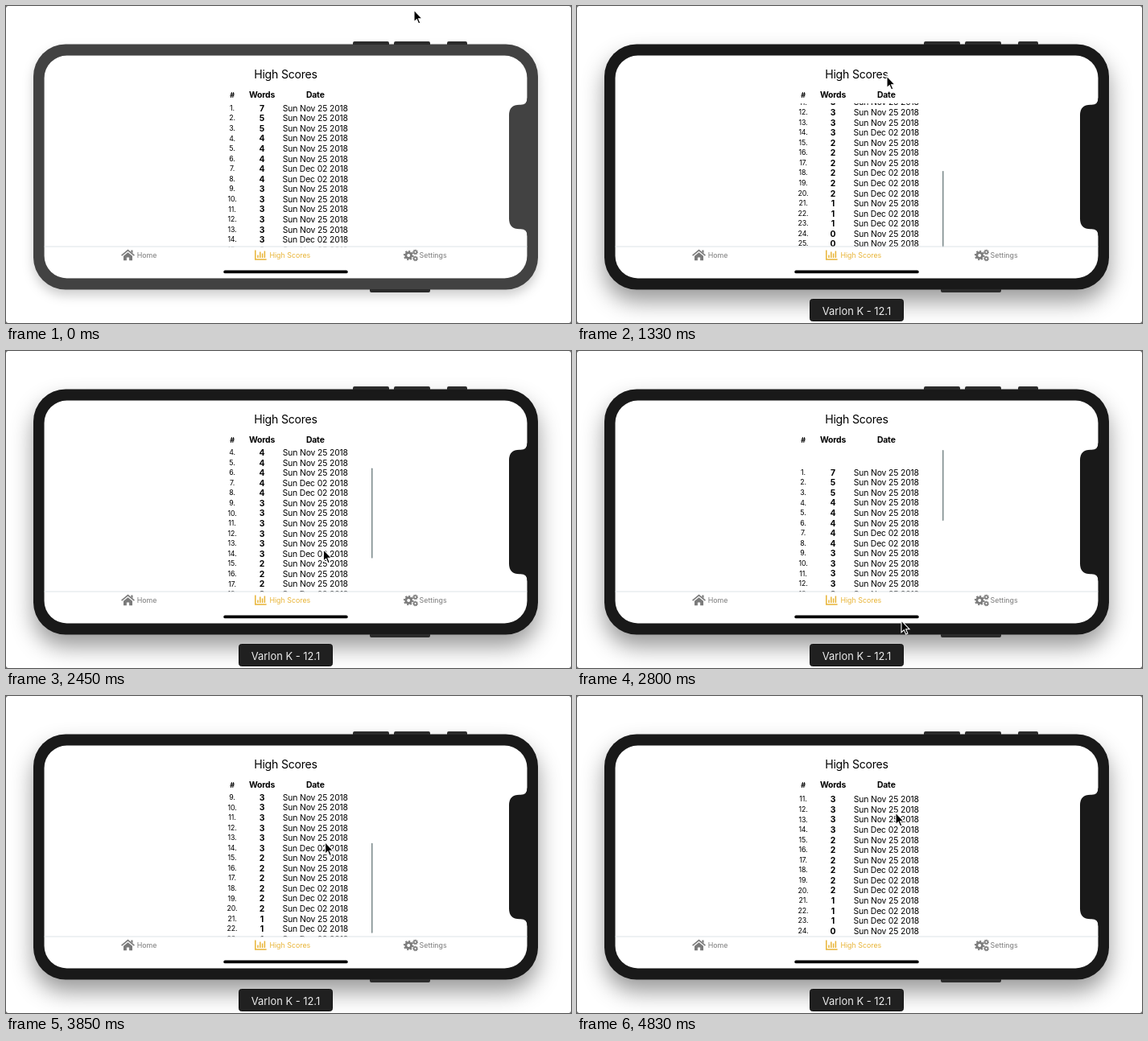
Animation of 702x394 px, one loop 5040 ms. Source, as an HTML page:

```html
<!DOCTYPE html>
<html lang="en">
<head>
<meta charset="utf-8">
<title>High Scores</title>
<style>
  html, body { margin: 0; width: 100%; height: 100%; overflow: hidden; background: #fff; }
  svg { display: block; width: 702px; height: 394px; font-family: Inter, sans-serif; text-anchor: middle; }
  .cell { font-size: 10.4px; letter-spacing: -.15px; }
  .bold { font-weight: 700; }
  .index { font-size: 8.8px; letter-spacing: -.1px; }
  .tab { font-size: 8.85px; text-anchor: start; stroke: none; }
  #shell { --case: #424242; --shadow: drop-shadow(0 7px 7px rgba(0,0,0,.2)); }
  #shell.active { --case: #191919; --shadow: drop-shadow(0 15px 14px rgba(0,0,0,.4)); }
  #case { fill: var(--case); filter: var(--shadow); }
  #notch { fill: var(--case); }
</style>
</head>
<body>
<svg viewBox="0 0 702 394">
  <defs>
    <clipPath id="listClip"><rect x="250" y="121" width="220" height="178.3"/></clipPath>
    <g id="gear" fill="none">
      <circle r="3.4" stroke-width="2.8"/>
      <circle r="5.3" stroke-width="2" pathLength="16" stroke-dasharray="1 1"/>
    </g>
  </defs>
  <path d="M0 0H2L0 2ZM702 0V2L700 0ZM0 394V392L2 394ZM702 394H700L702 392Z" fill="#777"/>

  <g id="shell">
    <rect id="case" x="34" y="47.5" width="627" height="305" rx="40"/>
    <path d="M431 48V46Q431 44 433 44H474Q476 44 476 46V48ZM482 48V46Q482 44 484 44H525Q527 44 527 46V48ZM548 48V46Q548 44 550 44H571Q573 44 573 46V48ZM452 352V354Q452 356 454 356H525Q527 356 527 354V352Z" fill="#2b2b2b"/>
    <rect x="47.5" y="61.5" width="600" height="277" rx="28"/>
    <rect x="47.5" y="61.5" width="600" height="277" rx="28" fill="#fff"/>
    <path id="notch" d="M649 114.5H647.5Q647.5 122.7 639.5 122.7H638Q625 122.7 625 135.7V264.3Q625 277.3 638 277.3H639.5Q647.5 277.3 647.5 285.5H649Z"/>
  </g>

  <text x="347.5" y="90.4" font-size="14.1" letter-spacing="-.22">High Scores</text>
  <g class="cell bold">
    <text x="281" y="113.5" class="index">#</text>
    <text x="318" y="114.4">Words</text>
    <text x="384.3" y="114.4">Date</text>
  </g>

  <g clip-path="url(#listClip)">
    <g id="rows"></g>
    <rect id="indicator" x="454" width="1.5" rx=".7" fill="#7b898a"/>
  </g>

  <rect x="47.5" y="298.5" width="600" height="1" fill="#d9e0e4" fill-opacity=".85"/>
  <g fill="#7b7b7b" stroke="#7b7b7b">
    <path d="M143.6 310.2L151.5 303.6L159.4 310.2" fill="none" stroke-width="1.6"/>
    <path d="M146 310.8L151.5 306.2L157 310.8V316.3H153.1V312.4H149.9V316.3H146ZM155.3 303.6H157.5V307.4L155.3 305.5Z" stroke="none"/>
    <text class="tab" x="162.7" y="313.2">Home</text>
    <use href="#gear" x="500.2" y="310"/>
    <use href="#gear" transform="translate(508.6 305.8) scale(.54)"/>
    <use href="#gear" transform="translate(508.6 313.9) scale(.54)"/>
    <text class="tab" x="513.6" y="313.2">Settings</text>
  </g>
  <g fill="#e8b437" stroke="#e8b437">
    <path d="M309.8 303.6V315H323.6M313 313V309.4M315.8 313V305.6M318.6 313V307.6M321.4 313V304.4" fill="none" stroke-width="1.5"/>
    <text class="tab" x="327.4" y="313.2">High Scores</text>
  </g>
  <rect x="270.3" y="328.6" width="154.4" height="3.7" rx="1.85"/>

  <g id="label">
    <rect x="289.5" y="364.5" width="116" height="27" rx="3" fill="#202020" stroke="#141414"/>
    <text x="347.5" y="383.6" font-size="12.9" fill="#ececec">Varlon K - 12.1</text>
  </g>
  <path id="cursor" d="M0 0V14.6L3.3 11.6L5.6 17L7.9 16L5.6 10.7H10Z" stroke="#fff" stroke-width="1.1"/>
</svg>
<script>
const LOOP = 5040, STEP = 70;
const ROW_HEIGHT = 12.56, MAX_SCROLL = 124, VIEWPORT = 189;
const SPRING = 0.013;
const $ = id => document.getElementById(id);

// Pointer stops: time, x, y
const stops = [
  [0, 507, 5], [560, 393, 228], [840, 392, 228], [1280, 385, 87], [1534, 385, 87],
  [2117, 386, 161], [2790, 403, 335], [2870, 403, 336], [3260, 398, 283],
  [3360, 398, 283], [4100, 396, 145], [LOOP, 396, 145]
];
// Drags: press time, release time, scroll offset at press, resting offset
const drags = [
  [840, 1330, 0, MAX_SCROLL],
  [2117, 2870, MAX_SCROLL, 0],
  [3360, 4200, 0, MAX_SCROLL]
];

const clamp = (v, lo, hi) => Math.min(hi, Math.max(lo, v));

function pointer(t) {
  const i = stops.findIndex(s => s[0] > t);
  const [t0, x0, y0] = stops[i - 1], [t1, x1, y1] = stops[i];
  const u = (t - t0) / (t1 - t0), e = u * u * (3 - 2 * u);
  return { x: x0 + (x1 - x0) * e, y: y0 + (y1 - y0) * e };
}

function rubberBand(offset) {
  const edge = clamp(offset, 0, MAX_SCROLL), over = offset - edge;
  const pull = (1 - 1 / (Math.abs(over) * 0.55 / VIEWPORT + 1)) * VIEWPORT;
  return edge + Math.sign(over) * pull;
}

function scrollAt(t) {
  const drag = drags.filter(d => d[0] <= t).pop();
  if (!drag) return 0;
  const [press, release, from, rest] = drag;
  const offset = rubberBand(from + pointer(press).y - pointer(Math.min(t, release)).y);
  const k = SPRING * Math.max(0, t - release);
  return rest + (offset - rest) * (1 + k) * Math.exp(-k);
}

function buildRows() {
  const words = [..."7554444433333322222211100"];
  const december = new Set([7, 8, 14, 18, 19, 20, 22, 23]);
  $("rows").innerHTML = words.map((count, i) => {
    const n = i + 1, y = 130.8 + ROW_HEIGHT * i;
    const date = december.has(n) ? "Sun Dec 02 2018" : "Sun Nov 25 2018";
    return `<text class="index" x="281" y="${y - 0.9}">${n}.</text>
      <text class="cell bold" x="318" y="${y}">${count}</text>
      <text class="cell" x="384.3" y="${y}">${date}</text>`;
  }).join("");
}

function render(now) {
  const t = Math.floor(now % LOOP / STEP) * STEP;
  const { x, y } = pointer(t), scroll = scrollAt(t);
  const inside = clamp(scroll, 0, MAX_SCROLL), over = Math.abs(scroll - inside);
  const length = 112 - over;
  const top = scroll > MAX_SCROLL ? 308 - length : 123 + 73 * inside / MAX_SCROLL;

  $("cursor").setAttribute("transform", `translate(${x} ${y})`);
  $("rows").setAttribute("transform", `translate(0 ${-scroll})`);
  $("indicator").setAttribute("y", top);
  $("indicator").setAttribute("height", length);
  $("indicator").setAttribute("opacity", t <= drags[0][0] ? 0 : clamp((4830 - t) / 210, 0, 1));
  $("shell").classList.toggle("active", t >= 700);
  $("label").setAttribute("visibility", t >= 420 ? "visible" : "hidden");
}

buildRows();
const start = performance.now();
(function tick() {
  render(performance.now() - start);
  requestAnimationFrame(tick);
})();
</script>
</body>
</html>
```
